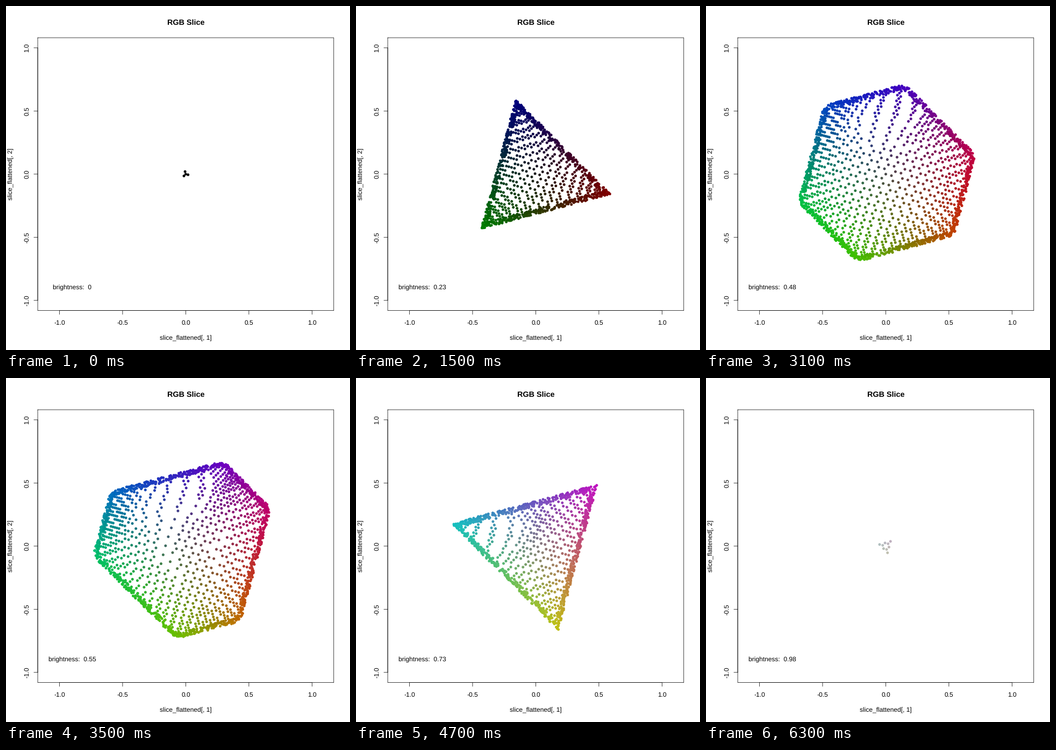
Animation of 640 by 640 pixels, one loop 6.4 s. Source, as a matplotlib script:

```python
import numpy as np
import matplotlib.pyplot as plt
from matplotlib.animation import FuncAnimation

plt.rcParams["font.family"] = ["Liberation Sans", "DejaVu Sans"]
plt.rcParams["text.hinting"] = "none"

SIZE, DPI = 640, 80
PX = 72 / DPI                     # points per pixel
FRAMES = 64
LEFT, RIGHT, TOP, BOTTOM = 59.04, 609.76, 59.04, 566.56
CX, CY, SCALE = 334.4, 312.8, 234.96
LEVELS = 25

# Directions of the red, green and blue axes seen along the grey diagonal
ANGLES = np.radians([-15, -135, 105])
BASIS = np.sqrt(2 / 3) * np.column_stack([np.cos(ANGLES), np.sin(ANGLES)])


def s_curve(t, bend):
    """Levels packed towards both ends of the range."""
    return t - bend * np.sin(2 * np.pi * t) / (2 * np.pi) - 0.095 * t * (1 - t)


def grid_points():
    t = np.linspace(0, 1, LEVELS)
    axes = [s_curve(t, bend) for bend in (0.36, 0.32, 0.30)]
    rgb = np.stack(np.meshgrid(*axes, indexing="ij"), -1).reshape(-1, 3)
    # Red levels spread apart where blue is strong
    red, blue = rgb[:, 0], rgb[:, 2]
    weight = np.exp(-((blue - 0.85) / 0.16) ** 2)
    gap = red - 0.4
    rgb[:, 0] = red + 1.2 * weight * gap * np.exp(-(gap / 0.2) ** 2)
    return np.clip(rgb, 0, 1)


def face_points(count=3000):
    """Extra colours lying on the six faces of the cube."""
    rng = np.random.default_rng(7)
    faces = []
    for channel in range(3):
        for value in (0, 1):
            face = rng.random((count, 3))
            face[:, channel] = value
            faces.append(face)
    rgb = np.concatenate(faces)
    total = rgb.sum(axis=1)
    return rgb[(total > 0.12) & (total < 2.88)]


colors = np.concatenate([grid_points(), face_points()])
shades = 0.75 * colors ** 1.3
brightness = colors.mean(axis=1)
places = np.array([CX, CY]) + SCALE * (colors @ BASIS) * [1, -1]

fig = plt.figure(figsize=(SIZE / DPI, SIZE / DPI), dpi=DPI, facecolor="white")
ax = fig.add_axes([0, 0, 1, 1])
ax.set_xlim(0, SIZE)
ax.set_ylim(SIZE, 0)
ax.axis("off")


def line(xs, ys):
    ax.plot(xs, ys, color="black", lw=0.75 * PX, solid_capstyle="round",
            solid_joinstyle="round", snap=False)


def label(x, y, text, size=12, **style):
    return ax.text(x, y, text, fontsize=size * PX, ha="center", va="baseline",
                   rotation_mode="anchor", **style)


dots = ax.scatter([], [], s=(5 * PX) ** 2, linewidths=0)

line([LEFT, RIGHT, RIGHT, LEFT, LEFT], [TOP, TOP, BOTTOM, BOTTOM, TOP])
line([CX - SCALE, CX + SCALE], [BOTTOM, BOTTOM])
line([LEFT, LEFT], [CY - SCALE, CY + SCALE])
for tick in (-1, -0.5, 0, 0.5, 1):
    x, y = CX + SCALE * tick, CY - SCALE * tick
    line([x, x], [BOTTOM, BOTTOM + 7.2])
    line([LEFT - 7.2, LEFT], [y, y])
    label(x, 593, f"{tick:.1f}")
    label(42, y, f"{tick:.1f}", rotation=90)

label(CX, 35, "RGB Slice", 14.4, weight="bold")
label(CX, 622, "slice_flattened[, 1]")
label(13, CY, "slice_flattened[, 2]", rotation=90)
caption = label(CX - 0.9 * SCALE, 528, "")


def update(i):
    level = i / FRAMES
    near = np.abs(brightness - level) < 1 / FRAMES - 1e-9
    dots.set_offsets(places[near])
    dots.set_facecolor(shades[near])
    caption.set_text(f"brightness:  {round(level, 2):g}")
    return dots, caption


anim = FuncAnimation(fig, update, frames=FRAMES, interval=100,
                     repeat=True, repeat_delay=0)
plt.show()
```
